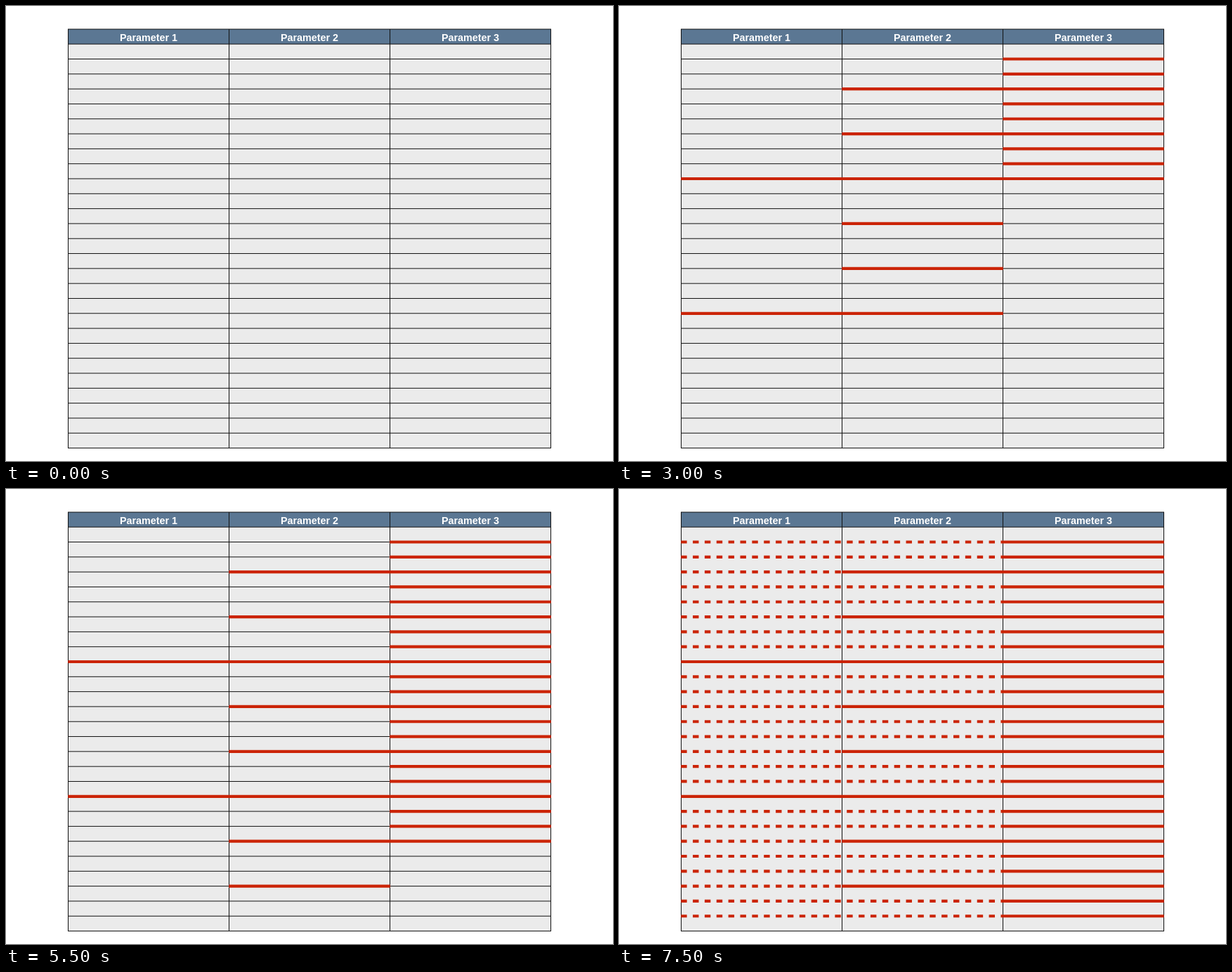
Write an HTML page that moves like this. It is 864x648 px and loops after 8000 ms.

```html
<!DOCTYPE html>
<html lang="en">
<head>
<meta charset="utf-8">
<title>Parameter table</title>
<style>
html, body { margin: 0; width: 100%; height: 100%; overflow: hidden; background: #fff; }
svg { display: block; width: 864px; height: 648px; }
text { font: bold 14.3px "Liberation Sans", Arial, sans-serif; fill: #fff; text-anchor: middle; }
.grid { stroke: #111; stroke-width: 1; }
.red { stroke: #cb2406; stroke-width: 4.2; }
</style>
</head>
<body>
<svg id="stage" viewBox="0 0 864 648"></svg>
<script>
const svg = document.getElementById('stage');
const STEP = 500, LOOP = 8000, ROWS = 27;
const LEFT = 88.5, COL = 229, TOP = 33, HEAD = 54.2, ROW = 21.31;
const DASH = 8.43;
const colX = c => LEFT + c * COL;
const rowY = r => HEAD + r * ROW;
const BOTTOM = rowY(ROWS);

function add(tag, attrs, label) {
  const el = document.createElementNS('http://www.w3.org/2000/svg', tag);
  for (const key in attrs) el.setAttribute(key, attrs[key]);
  if (label) el.textContent = label;
  return svg.appendChild(el);
}

const line = (cls, x1, y1, x2, y2) => add('line', { class: cls, x1, y1, x2, y2 });
const show = (el, on) => el.setAttribute('visibility', on ? 'visible' : 'hidden');

// Step at which the solid rule below row r of column c appears
function solidStep(c, r) {
  if (c === 0) return r % 9 ? Infinity : 1;
  const block = Math.floor((r - 1) / 9);
  if (c === 1) return r % 3 ? Infinity : 2 + 4 * block;
  return 3 + 4 * block + Math.floor((r - 1) % 9 / 3);
}

const dashStep = c => c === 0 ? 15 : c === 1 ? 14 : Infinity;

add('rect', { x: LEFT, y: TOP, width: 3 * COL, height: HEAD - TOP, fill: '#5b7793' });
add('rect', { x: LEFT, y: HEAD, width: 3 * COL, height: BOTTOM - HEAD, fill: '#ebebeb' });

const cells = [];
for (let c = 0; c < 3; c++) {
  for (let r = 1; r < ROWS; r++) {
    const thin = line('grid', colX(c), rowY(r), colX(c + 1), rowY(r));
    cells.push({ c, r, thin });
  }
}
for (const y of [TOP, HEAD, BOTTOM]) line('grid', LEFT - 0.5, y, colX(3) + 0.5, y);
for (let c = 0; c < 4; c++) line('grid', colX(c), TOP, colX(c), BOTTOM);
for (let c = 0; c < 3; c++) {
  add('text', { x: colX(c) + COL / 2, y: 50.3 }, 'Parameter ' + (c + 1));
}
for (const cell of cells) {
  const y = rowY(cell.r);
  cell.thick = line('red', colX(cell.c) - 0.3, y, colX(cell.c + 1) + 0.3, y);
}

function draw(step) {
  for (const { c, r, thin, thick } of cells) {
    const solid = step >= solidStep(c, r);
    const dashed = !solid && step >= dashStep(c);
    show(thin, !solid && !dashed);
    show(thick, solid || dashed);
    thick.setAttribute('stroke-dasharray', dashed ? DASH + ' ' + DASH : 'none');
    // Neighbouring dashed rules share one continuous pattern
    thick.setAttribute('stroke-dashoffset', c === 1 && step >= dashStep(0) ? COL : 0);
  }
}

const start = performance.now();
let last = -1;
function tick() {
  const step = Math.floor((performance.now() - start) % LOOP / STEP);
  if (step !== last) draw(last = step);
  requestAnimationFrame(tick);
}
tick();
</script>
</body>
</html>
```
